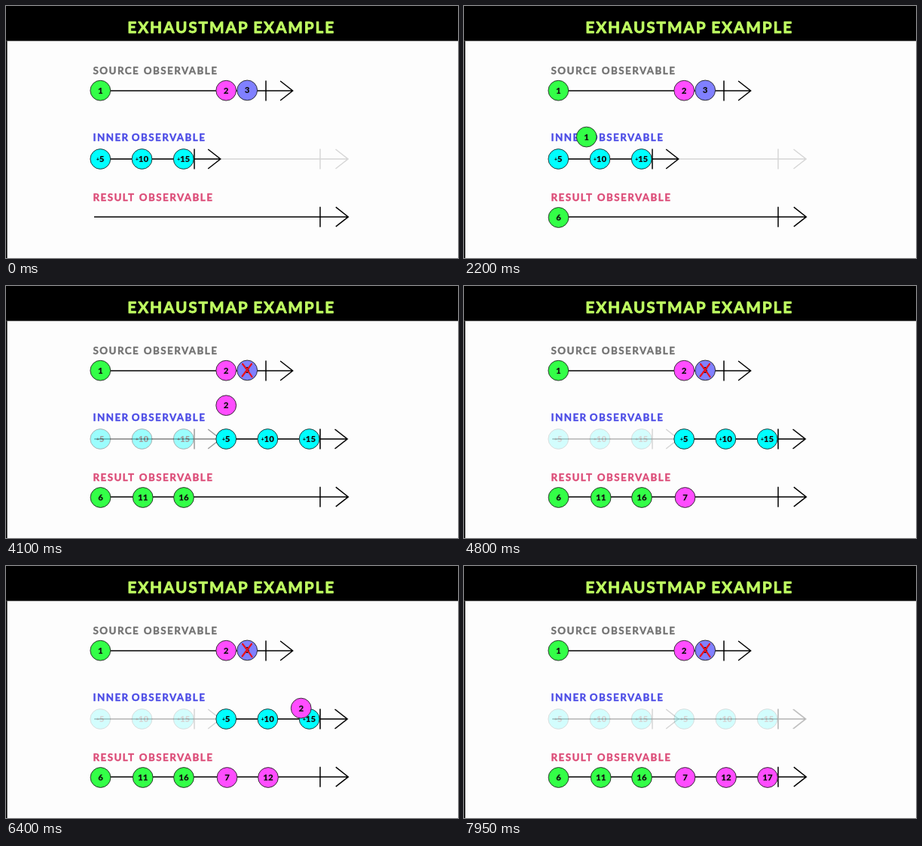
Animation of 600x336 px, one loop 8000 ms. Source, as an HTML page:

```html
<!DOCTYPE html>
<html lang="en">
<head>
<meta charset="utf-8">
<title>exhaustMap example</title>
<style>
  html, body { margin: 0; width: 100%; height: 100%; overflow: hidden; background: #fdfdfd; }
  svg { display: block; width: 600px; height: 336px; }
  text { font-family: Lato, "Open Sans", sans-serif; font-weight: 700; stroke-linejoin: round; }
  .title { font-size: 20.8px; letter-spacing: 1.9px; fill: #c0ff62; stroke: #c0ff62; stroke-width: .8px; }
  .label { font-size: 13.3px; letter-spacing: 1.5px; stroke-width: .45px; }
  .num { font-size: 11.5px; font-weight: 900; text-anchor: middle; fill: #111; }
  .plus { font-size: 6.5px; }
  .axis { fill: none; stroke-width: 1.5; }
  circle { stroke: #222; stroke-width: .9; }
</style>
</head>
<body>
<svg id="stage" viewBox="0 0 600 336"></svg>
<script>
const LOOP = 8000, TO_INNER = 600, TO_RESULT = 300, FADED = 0.16;
const GREEN = '#33ff47', PINK = '#ff4dff', BLUE = '#8080ff', CYAN = '#00ffff';
const SOURCE_Y = 113, INNER_Y = 204, RESULT_Y = 282;
const FIRST_X = 125.3, SECOND_X = 292.2, STEP = 55.2;
const stage = document.getElementById('stage');

function add(parent, tag, attrs, text) {
  const node = document.createElementNS('http://www.w3.org/2000/svg', tag);
  for (const key in attrs) node.setAttribute(key, attrs[key]);
  if (text !== undefined) node.textContent = text;
  parent.append(node);
  return node;
}

function words(cls, y, color, parts) {
  for (const [x, word] of parts)
    add(stage, 'text', { x, y, class: cls, ...(color && { fill: color, stroke: color }) }, word);
}

function axis(parent, x1, tick, x2, y, color = '#000') {
  return add(parent, 'path', {
    class: 'axis', stroke: color,
    d: `M${x1} ${y}H${x2}M${tick} ${y - 13.5}v27M${x2 - 16.5} ${y - 13}L${x2} ${y}l-16.5 13`
  });
}

function ball(parent, x, y, fill, value, plus) {
  const g = add(parent, 'g', { transform: `translate(${x} ${y})` });
  add(g, 'circle', { r: 13.4, fill });
  const label = add(g, 'text', { class: 'num', y: 4 }, plus ? '' : value);
  if (plus) {
    add(label, 'tspan', { class: 'plus', dy: -1.2 }, '+');
    add(label, 'tspan', { dy: 1.2 }, value);
  }
  return { g, label };
}

function innerRun(x0, tick, end) {
  const run = add(stage, 'g', {});
  axis(run, x0 - 8, tick, end, INNER_Y);
  [5, 10, 15].forEach((n, i) => ball(run, x0 + i * STEP, INNER_Y, CYAN, n, true));
  return [...run.children];
}

// Backdrop and headings
add(stage, 'rect', { width: 600, height: 336, fill: '#fdfdfd' });
add(stage, 'rect', { width: 600, height: 46.6, fill: '#000' });
add(stage, 'rect', { y: 46.6, width: 1.6, height: 289.4, fill: '#000' });
words('title', 36.2, '', [[161.3, 'EXHAUSTMAP'], [328.2, 'EXAMPLE']]);
words('label', 91, '#727272', [[115.5, 'SOURCE'], [182.7, 'OBSERVABLE']]);
words('label', 179.7, '#4c4ce6', [[115.5, 'INNER'], [166.7, 'OBSERVABLE']]);
words('label', 259.7, '#dc4c78', [[115.5, 'RESULT'], [176.7, 'OBSERVABLE']]);

// Timelines
axis(stage, 117, 345, 380.6, SOURCE_Y);
ball(stage, FIRST_X, SOURCE_Y - 0.3, GREEN, 1);
ball(stage, SECOND_X, SOURCE_Y - 0.3, PINK, 2);
ball(stage, 320.2, SOURCE_Y - 0.6, BLUE, 3);
const cross = add(stage, 'path', {
  d: 'M314 104Q320 111 326.5 121M326 104Q320 112 313.5 120.5',
  fill: 'none', stroke: '#e8101c', 'stroke-width': 2.2, 'stroke-linecap': 'round'
});
axis(stage, 117, 417, 454, INNER_Y, '#d6d6d6');
const firstRun = innerRun(FIRST_X, 250, 284.7);
const secondRun = innerRun(SECOND_X, 417, 453);
axis(stage, 117, 417, 454.3, RESULT_Y - 0.8);

// Each emission travels source -> inner -> result
const emissions = [
  [900, 1, 5, 125.5], [1832, 1, 10, 181.7], [2925, 1, 15, 236],
  [3798, 2, 5, 293.5], [5006, 2, 10, 348], [5923, 2, 15, 403]
].map(([start, value, plus, x]) => {
  const from = value === 1 ? FIRST_X : SECOND_X;
  return {
    start, value, sum: value + plus, x, from,
    meetX: from + (plus / 5 - 1) * STEP,
    meetY: plus === 15 ? 198 : INNER_Y,
    ...ball(stage, 0, 0, value === 1 ? GREEN : PINK, value)
  };
});

const clamp = v => Math.min(1, Math.max(0, v));
const ease = v => (1 - Math.cos(Math.PI * clamp(v))) / 2;
const mix = (a, b, p) => a + (b - a) * p;
const ramp = (t, start, end) => clamp((t - start) / (end - start));
const setOpacity = (nodes, value) => nodes.forEach(n => n.setAttribute('opacity', value));

function draw(t) {
  for (const e of emissions) {
    const down = ease((t - e.start) / TO_INNER);
    const out = ease((t - e.start - TO_INNER) / TO_RESULT);
    const x = mix(mix(e.from, e.meetX, down), e.x, out);
    const y = mix(mix(SOURCE_Y, e.meetY, down), RESULT_Y, out);
    e.g.setAttribute('transform', `translate(${x} ${y})`);
    e.g.setAttribute('visibility', t < e.start ? 'hidden' : 'visible');
    e.label.textContent = t < e.start + TO_INNER ? e.value : e.sum;
  }
  setOpacity(firstRun, mix(1, FADED, ramp(t, 3800, 4210)));
  setOpacity(secondRun, ramp(t, 3750, 4020) * mix(1, FADED, ramp(t, 6900, 7330)));
  setOpacity([cross], ramp(t, 3800, 4050));
}

const begin = performance.now();
function tick() {
  draw((performance.now() - begin) % LOOP);
  requestAnimationFrame(tick);
}
draw(0);
requestAnimationFrame(tick);
</script>
</body>
</html>
```
